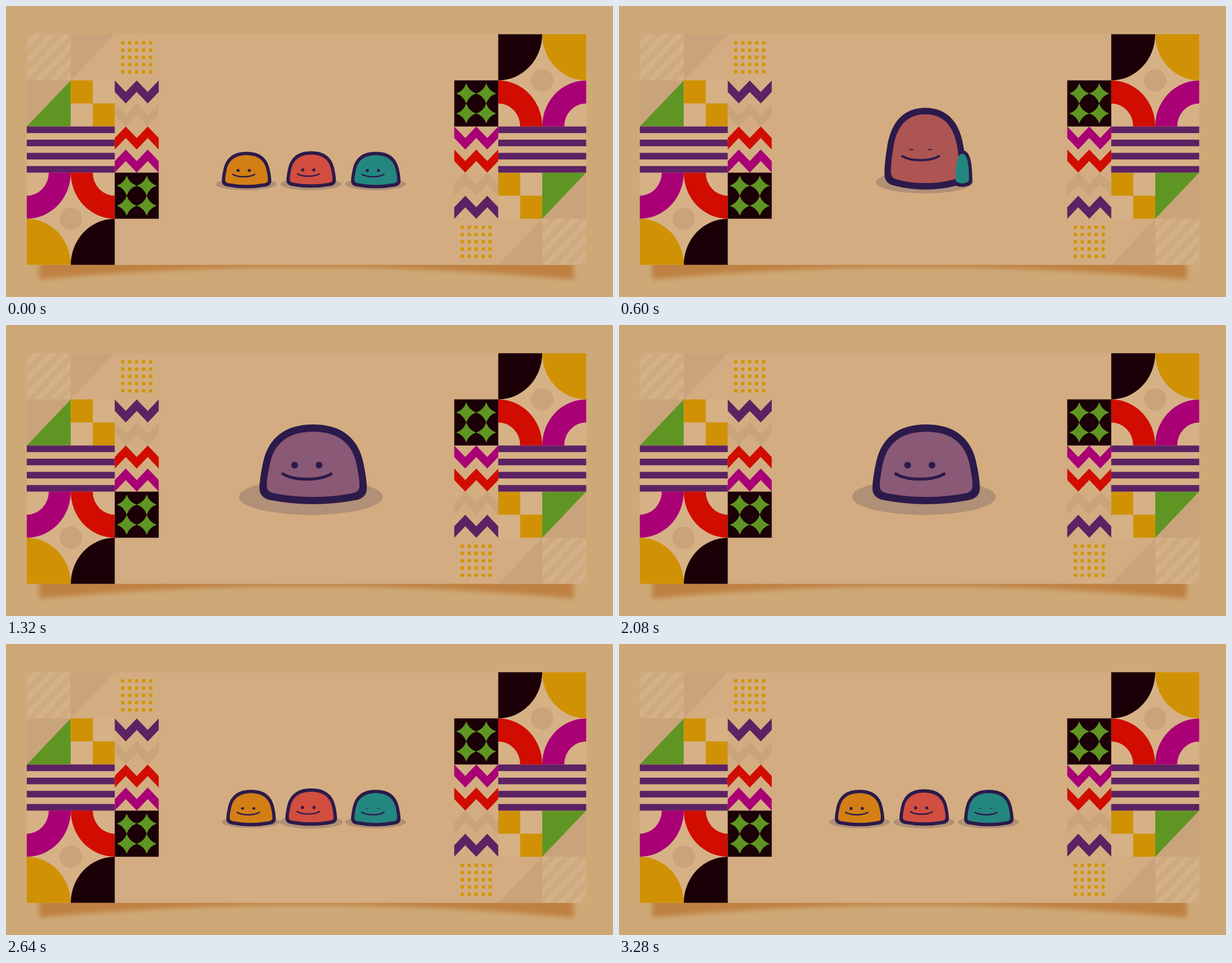
Animation of 1080x518 px, one loop 3.32 s. Source, as an HTML page with a canvas:

```html
<!DOCTYPE html>
<html lang="en">
<head>
<meta charset="utf-8">
<title>Merging blobs</title>
<style>
  html, body { margin: 0; width: 100%; height: 100%; overflow: hidden; background: #cea977; }
  canvas { display: block; width: 1080px; height: 518px; }
</style>
</head>
<body>
<canvas id="stage" width="1080" height="518"></canvas>
<script>
const LOOP = 3320, STEP = 40;
const W = 1080, H = 518;
const CARD = '#d3ad81', DIM = '#c9a47b', LIGHT = '#d6b186';
const PURPLE = '#5c2263', MAGENTA = '#a90075', RED = '#d00d00';
const GOLD = '#d09204', GREEN = '#5f9623', BLACK = '#1c0008';
const NAVY = '#2c1a4b', SHADE = '#b09076';
const ctx = document.getElementById('stage').getContext('2d');

// ---------- Backdrop ----------
const TW = 78.25, TH = 82.1;   // pattern tile
const X0 = 37, Y0 = 50.3;

function makeBackdrop() {
  const cv = document.createElement('canvas');
  cv.width = W;
  cv.height = H;
  const g = cv.getContext('2d');
  const col = n => X0 + n * TW;
  const row = n => Y0 + n * TH;

  const rect = (c, x, y, w, h) => { g.fillStyle = c; g.fillRect(x, y, w, h); };
  const poly = (c, ...pts) => {
    g.fillStyle = c;
    g.beginPath();
    pts.forEach(([x, y]) => g.lineTo(x, y));
    g.fill();
  };
  const disc = (c, x, y, r) => {
    g.fillStyle = c;
    g.beginPath();
    g.arc(x, y, r, 0, 7);
    g.fill();
  };
  // Quarter of an ellipse, optionally hollow
  const quarter = (c, x, y, a, inner) => {
    const b = a + Math.PI / 2;
    g.fillStyle = c;
    g.beginPath();
    g.ellipse(x, y, TW, TH, 0, a, b);
    if (inner) g.ellipse(x, y, TW * inner, TH * inner, 0, b, a, true);
    else g.lineTo(x, y);
    g.fill();
  };
  const zigzag = (c, y, up) => {
    const edge = off => [0, 1, 2, 3, 4].map(i =>
      [col(2 + i / 4), y + off + ((i % 2 === 1) !== up ? TH / 4 : 0)]);
    poly(c, ...edge(0), ...edge(TH / 4).reverse());
  };
  const star = (x, y, r) => {
    const k = r / 4;
    g.fillStyle = GREEN;
    g.beginPath();
    g.moveTo(x, y - r);
    g.quadraticCurveTo(x + k, y - k, x + r, y);
    g.quadraticCurveTo(x + k, y + k, x, y + r);
    g.quadraticCurveTo(x - k, y + k, x - r, y);
    g.quadraticCurveTo(x - k, y - k, x, y - r);
    g.fill();
  };

  function panel() {
    // Faint diagonal stripes and triangles
    g.save();
    g.beginPath();
    g.rect(X0, Y0, TW, TH);
    g.clip();
    rect('#ceaa7f', X0, Y0, TW, TH);
    for (let n = 1; n < 12; n += 2) {
      const a = n / 6, b = a + 1 / 6;
      poly('#d5b188', [col(a), Y0], [col(b), Y0], [X0, row(b)], [X0, row(a)]);
    }
    g.restore();
    poly(DIM, [col(1), Y0], [col(2), Y0], [col(1), row(1)]);
    poly(DIM, [X0, row(1)], [col(1), row(1)], [X0, row(2)]);

    for (let i = 0; i < 25; i++) {
      disc('#d39604', 207.8 + (i % 5) * 12.4, 65.6 + Math.floor(i / 5) * 12.9, 3.3);
    }

    poly(GREEN, [X0, row(2)], [col(1), row(1)], [col(1), row(2)]);
    rect(LIGHT, col(1), row(1), TW, TH);
    rect(GOLD, col(1), row(1), TW / 2, TH / 2);
    rect(GOLD, col(1.5), row(1.5), TW / 2, TH / 2);

    rect(LIGHT, X0, row(2), 2 * TW, 3 * TH);
    for (let i = 0; i < 4; i++) rect(PURPLE, X0, row(2 + i * 2 / 7), 2 * TW, TH / 7);

    quarter(MAGENTA, X0, row(3), 0, 0.5);
    quarter(RED, col(2), row(3), Math.PI / 2, 0.5);
    disc(DIM, col(1), row(4), 20);
    quarter(GOLD, X0, row(5), -Math.PI / 2);
    quarter(BLACK, col(2), row(5), Math.PI);

    [PURPLE, DIM, RED, MAGENTA].forEach((c, i) => zigzag(c, row(1 + i / 2), i > 1));

    rect(BLACK, col(2), row(3), TW, TH);
    for (const dx of [-17.8, 17.8])
      for (const dy of [-17.8, 17.8])
        star(col(2.5) + dx, row(3.5) + dy, 17.8);
  }

  rect('#cea977', 0, 0, W, H);
  g.save();
  g.filter = 'blur(4px)';
  g.fillStyle = '#bf8142';
  g.beginPath();
  g.moveTo(59, 450);
  g.lineTo(1010, 450);
  g.lineTo(1010, 487);
  g.quadraticCurveTo(534, 442, 59, 487);
  g.fill();
  g.restore();

  // The right panel is the left one turned half round
  rect(CARD, X0, Y0, 995.3, 5 * TH);
  panel();
  g.translate(1069.3, 511.1);
  g.rotate(Math.PI);
  panel();
  return cv;
}
const backdrop = makeBackdrop();

// ---------- Motion ----------
const clamp = (v, lo = 0, hi = 1) => Math.min(hi, Math.max(lo, v));
const mix = (a, b, k) => a + (b - a) * k;
const mixAll = (a, b, k) => a.map((v, i) => mix(v, b[i], k));
const span = (t, a, b) => clamp((t - a) / (b - a));
const smooth = (t, a, b) => { const k = span(t, a, b); return k * k * (3 - 2 * k); };

// Body alone, with one neighbour merged in, with both
const POSES = [
  { box: [543, 323.5, 88, 65], shade: [542.5, 317, 54, 11], color: [210, 78, 64] },
  { box: [543.5, 324, 117, 77], shade: [544, 316, 73, 16], color: [208, 80, 48] },
  { box: [546.5, 319, 191, 142], shade: [542.5, 306, 128, 32], color: [137, 89, 117] }
];

const TRAVEL = 240, REACH = 68;
const SIDES = [
  { color: 'rgb(211,127,22)', home: 428, dir: 1, join: 120, part: 2475, shut: [2475, 2580] },
  { color: 'rgb(36,135,127)', home: 658, dir: -1, join: 400, part: 2260, shut: [2260, LOOP] }
];

// 1 at home, 0 once swallowed
function away(t, { join, part }) {
  return t < part
    ? 1 - span(t, join, join + TRAVEL) ** 2
    : Math.sin(span(t, part, part + TRAVEL) * Math.PI / 2);
}

const eyesOpen = (t, [a, b]) => clamp(Math.max(a - t, t - b) / 80, 0.2);

// Damped vertical stretch after the second merge
const stretch = t => t < 520 ? 0
  : 0.33 * Math.sin((t - 520) / 160 * Math.PI) * Math.exp((600 - t) / 120);

function bodyAt(t) {
  const one = smooth(t, 240, 380) - smooth(t, 2440, 2700);
  const two = smooth(t, 520, 680) - smooth(t, 2200, 2400);
  const pose = (key, k) => mixAll(mixAll(POSES[0][key], POSES[1][key], one), POSES[2][key], k);
  const [x, bottom, w, h] = pose('box', two);
  const s = stretch(t);
  const blob = {
    x, bottom: bottom + 16 * s, w: w * (1 - s / 6), h: h * (1 + s),
    color: `rgb(${pose('color', two).map(Math.round)})`,
    shade: pose('shade', two * two),
    eyes: eyesOpen(t, [590, 620])
  };
  blob.lw = 13 * Math.sqrt(blob.w / 191 * blob.h / 142);
  return blob;
}

function sideAt(t, side) {
  const a = away(t, side);
  const x = side.home + side.dir * REACH * (1 - a);
  const grow = smooth(a, 0.4, 0.95);
  const w = 88 * Math.min(1, a * 4 / 3);
  return {
    x, w, h: 65, bottom: mix(322, 324.5, grow), lw: Math.min(6, w / 4),
    color: side.color,
    shade: [x - 0.5, 317, 54 * grow, 11 * grow],
    eyes: eyesOpen(t, side.shut)
  };
}

// ---------- Blobs ----------
// Dome drawn in a box that stands on (x, bottom)
function dome(x, bottom, w, h) {
  ctx.save();
  ctx.translate(x, bottom);
  ctx.scale(w / 178, h / 129);
  ctx.beginPath();
  for (const s of [1, -1]) {
    ctx.moveTo(0, -129);
    ctx.bezierCurveTo(47 * s, -129, 73 * s, -107, 82 * s, -70);
    ctx.bezierCurveTo(86 * s, -52, 89 * s, -34, 89 * s, -22);
    ctx.bezierCurveTo(89 * s, -13, 84 * s, -9, 74 * s, -7);
    ctx.quadraticCurveTo(38 * s, 0, 0, 0);
  }
  ctx.restore();
}

function ellipse(c, x, y, rx, ry) {
  ctx.fillStyle = c;
  ctx.beginPath();
  ctx.ellipse(x, y, rx, ry, 0, 0, 7);
  ctx.fill();
}

function outline({ x, bottom, w, h, lw }) {
  dome(x, bottom - lw / 2, w - lw, h - lw);
  ctx.fillStyle = ctx.strokeStyle = NAVY;
  ctx.lineWidth = lw;
  ctx.lineJoin = 'round';
  ctx.fill();
  ctx.stroke();
}

function inside({ x, bottom, w, h, lw, color }) {
  dome(x, bottom - lw, w - 2 * lw, h - 2 * lw);
  ctx.fillStyle = color;
  ctx.fill();
}

function face({ x, bottom, w, h, eyes }) {
  const s = Math.min(w / 191, h / 142);
  const y = bottom - 69.5 * h / 142;
  for (const ex of [-33, 10.5]) ellipse(NAVY, x + ex * s, y, 6 * s, 6 * s * eyes);
  const mx = x - 11 * s, my = y + 15.5 * s, dip = my + 12.5 * s;
  ctx.beginPath();
  ctx.moveTo(mx - 43 * s, my);
  ctx.bezierCurveTo(mx - 22 * s, dip, mx + 22 * s, dip, mx + 43 * s, my);
  ctx.strokeStyle = NAVY;
  ctx.lineWidth = 5.3 * s;
  ctx.lineCap = 'round';
  ctx.stroke();
}

function draw(t) {
  ctx.drawImage(backdrop, 0, 0);
  const sides = SIDES.map(side => sideAt(t, side)).filter(b => b.w > 10);
  const blobs = [bodyAt(t), ...sides];
  blobs.forEach(b => ellipse(SHADE, ...b.shade));
  blobs.forEach(outline);
  blobs.forEach(inside);
  blobs.filter(b => b.w > 70).forEach(face);
}

const start = performance.now();
function tick() {
  const t = (performance.now() - start) % LOOP;
  draw(Math.floor(t / STEP) * STEP);
  requestAnimationFrame(tick);
}
tick();
</script>
</body>
</html>
```
